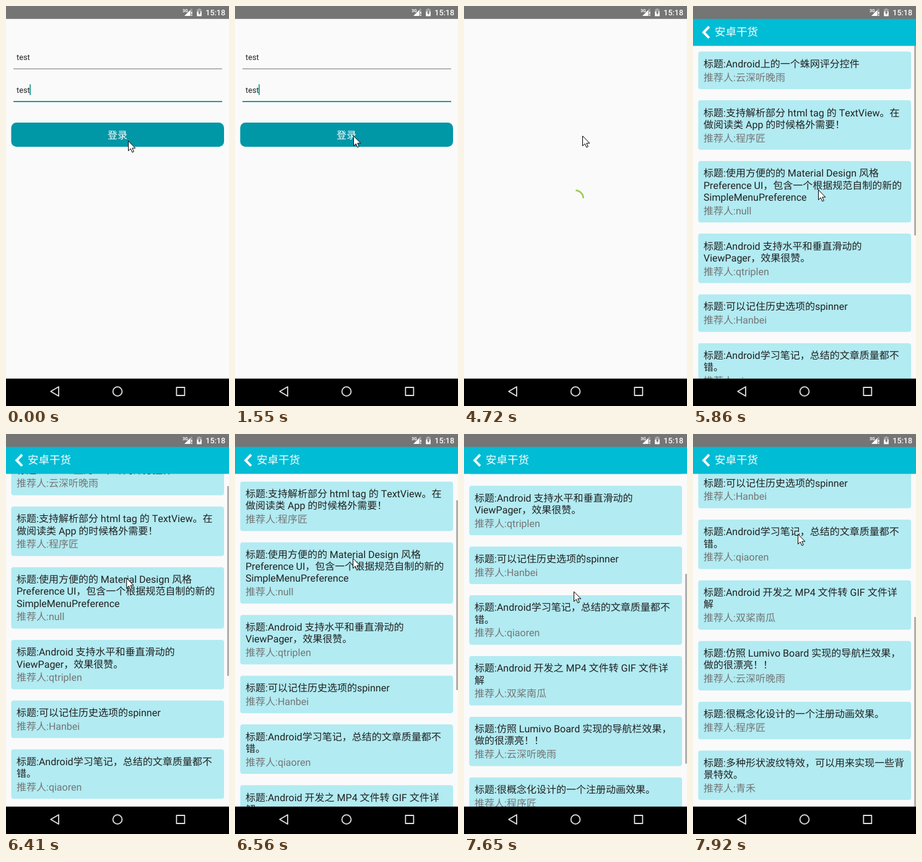
An HTML page that plays this animation: 360 by 645 pixels, repeating every 8 s.

```html
<!DOCTYPE html>
<html lang="zh-CN">
<head>
<meta charset="utf-8">
<title>安卓干货</title>
<style>
html, body { margin: 0; width: 100%; height: 100%; overflow: hidden; background: #fafafa; }
svg { display: block; position: absolute; left: 0; top: 0; }
text {
  font-family: Roboto, "Noto Sans CJK SC", "Noto Sans CJK", sans-serif;
  font-size: 16px; font-kerning: none; text-rendering: geometricPrecision; white-space: pre;
}
.title { fill: #212121; }
.sub { fill: #757575; }
</style>
</head>
<body>
<svg width="360" height="645" viewBox="0 0 360 645">
  <defs><clipPath id="view"><rect y="64" width="360" height="537"/></clipPath></defs>
  <rect width="360" height="645" fill="#fafafa"/>

  <g id="form">
    <g fill="#212121">
      <text x="17" y="87.3" style="font-size:12.7px">test</text>
      <text x="17" y="139.8" style="font-size:12.7px">test</text>
    </g>
    <rect x="12" y="100.8" width="337" height="1" fill="#757575"/>
    <rect x="12" y="153.2" width="337" height="1.8" fill="#009688"/>
    <rect id="caret" x="38.2" y="126.3" width="1.6" height="17.2" fill="#009688"/>
    <rect x="8.4" y="188" width="343.6" height="39" rx="8.5" fill="#0097a7"/>
    <text x="164" y="213.6" fill="#fff">登录</text>
  </g>

  <path id="spinner" fill="none" stroke="#9ccc55" stroke-width="2.6"/>

  <g id="list">
    <g clip-path="url(#view)">
      <g id="cards"></g>
      <rect id="bar" x="357" width="3" height="306" fill="#000"/>
    </g>
    <rect y="20" width="360" height="44.3" fill="#00bcd4"/>
    <g class="ink">
      <path d="M26 33.3L17.2 42.4L26 51.5" fill="none" stroke="#fff" stroke-width="3.9"/>
      <text x="35" y="47.8" fill="#fff" style="font-size:17.5px">安卓干货</text>
    </g>
  </g>

  <rect width="360" height="20.8" fill="#757575"/>
  <g fill="#fff">
    <text x="285" y="9.6" style="font-size:7px;font-weight:700">3G</text>
    <path d="M288 16L297.6 6.4V16Z"/>
    <path d="M294 10L298 6V4.6H300.6V8H298.4V16H288L294 10Z" opacity=".3"/>
    <path d="M298.9 9H300.6V13.2H298.9ZM298.9 14.3H300.6V16H298.9Z"/>
    <path d="M308.2 5.2H310.4V4H313.6V5.2H315.8V9H308.2Z" opacity=".35"/>
    <path d="M308.2 9H315.8V16.4H308.2Z"/>
    <path d="M312.9 6.5L309.8 11.5H311.6V15L314.5 10.1H312.9Z" fill="#757575"/>
    <text x="322.3" y="15" style="font-size:12.5px;font-weight:500">15:18</text>
  </g>

  <rect y="600.8" width="360" height="44.2" fill="#000"/>
  <g fill="none" stroke="#dedede" stroke-width="1.8" stroke-linejoin="round">
    <path d="M72.2 621.5L85 614V629Z"/>
    <circle cx="180" cy="621.5" r="7.4"/>
    <rect x="275.3" y="615" width="13" height="13"/>
  </g>

  <path id="mouse" d="M.5.6V16.6L4.2 13.1L6.8 18.9L9.3 17.8L6.8 12.2H11.8Z" fill="#fff" stroke="#000"/>
</svg>
<script>
const LOOP = 8000;
const $ = id => document.getElementById(id);
const set = (id, name, value) => $(id).setAttribute(name, value);

// Title lines, then the person who recommends it
const items = [
  [["Android上的一个蛛网评分控件"], "云深听晚雨"],
  [["支持解析部分 html tag 的 TextView。在", "做阅读类 App 的时候格外需要！"], "程序匠"],
  [["使用方便的的 Material Design 风格", "Preference UI，包含一个根据规范自制的新的", "SimpleMenuPreference"], "null"],
  [["Android 支持水平和垂直滑动的", "ViewPager，效果很赞。"], "qtriplen"],
  [["可以记住历史选项的spinner"], "Hanbei"],
  [["Android学习笔记，总结的文章质量都不", "错。"], "qiaoren"],
  [["Android 开发之 MP4 文件转 GIF 文件详", "解"], "双桨南瓜"],
  [["仿照 Lumivo Board 实现的导航栏效果，", "做的很漂亮！！"], "云深听晚雨"],
  [["很概念化设计的一个注册动画效果。"], "程序匠"],
  [["多种形状波纹特效，可以用来实现一些背", "景特效。"], "青禾"]
];

function add(parent, tag, attrs, text = "") {
  const el = document.createElementNS("http://www.w3.org/2000/svg", tag);
  for (const k in attrs) el.setAttribute(k, attrs[k]);
  el.textContent = text;
  parent.append(el);
  return el;
}

const LINE = 19.2, GAP = 18.2;
let cardY = 73.4;
for (const [lines, by] of items) {
  const height = 41.3 + LINE * lines.length;
  add($("cards"), "rect", { x: 8.4, y: cardY, width: 343.6, height, rx: 4, fill: "#b2ebf2" });
  const ink = add($("cards"), "g", { class: "ink" });
  let y = cardY + 25.4;
  lines.forEach((line, i) => {
    add(ink, "text", { x: 17, y: y + i * LINE, class: "title" }, (i ? "" : "标题:") + line);
  });
  y += (lines.length - 1) * LINE + 21.8;
  add(ink, "text", { x: 17, y, class: "sub" }, "推荐人:" + by);
  cardY += height + GAP;
}
const inks = document.querySelectorAll(".ink");

// After the login tap the screen refreshes in even beats
const TAP = 3758, BEAT = 137.3;
const LIST = 8, DRAG = 18, REST = 22, FLICK = 26, END = 30;

const span = (a, b, n) => Math.min(1, Math.max(0, (n - a) / (b - a)));
const smooth = k => k * k * (3 - 2 * k);

// Turning points of the pointer: beat, x, y
const turns = [
  [14, 191, 209], [15, 202, 296], [16, 217, 404],
  [20, 190, 200], [FLICK, 185, 346], [END, 169, 161]
];

function pointer(n) {
  let [, x, y] = turns[0];
  for (let i = 1; i < turns.length; i++) {
    const k = smooth(span(turns[i - 1][0], turns[i][0], n));
    x += (turns[i][1] - turns[i - 1][1]) * k;
    y += (turns[i][2] - turns[i - 1][2]) * k;
  }
  return [x, y];
}

function rim(deg) {
  const a = deg * Math.PI / 180;
  return `${180 + 12.6 * Math.sin(a)} ${310 - 12.6 * Math.cos(a)}`;
}

// The arc stretches and shrinks while its tail speeds round, once in four beats
function arc(n) {
  const p = (n + 1) % 4 / 4;
  const tail = 2 + 360 * p ** 3;
  const sweep = 88 + 120 * Math.sin(Math.PI * p) ** 4;
  return `M${rim(tail)}A12.6 12.6 0 ${+(sweep > 180)} 1 ${rim(tail + sweep)}`;
}

function draw(t) {
  const n = Math.floor((t - TAP) / BEAT);
  const scene = n < 0 ? "form" : n < LIST ? "spinner" : "list";
  for (const id of ["form", "spinner", "list"]) {
    set(id, "display", id === scene ? "inline" : "none");
  }
  set("mouse", "transform", `translate(${t < 130 ? [197, 217] : pointer(n)})`);

  if (scene === "form") set("caret", "opacity", +((t + 860) % 985 >= 440));
  if (scene === "spinner") set("spinner", "d", arc(n));
  if (scene === "list") {
    const offset = 161.5 * span(DRAG, REST, n) ** 1.1 + 244.2 * smooth(span(FLICK, END, n));
    const fade = n > FLICK ? 0 : span(REST + 1, FLICK, n);
    set("cards", "transform", `translate(0 ${-offset})`);
    set("bar", "y", 64 + offset * 537 / 942.7);
    set("bar", "opacity", .3 - .27 * fade);
    for (const el of inks) el.setAttribute("opacity", n > LIST ? 1 : .85);
  }
}

const start = performance.now();
function tick() {
  draw((performance.now() - start) % LOOP);
  requestAnimationFrame(tick);
}
tick();
</script>
</body>
</html>
```
